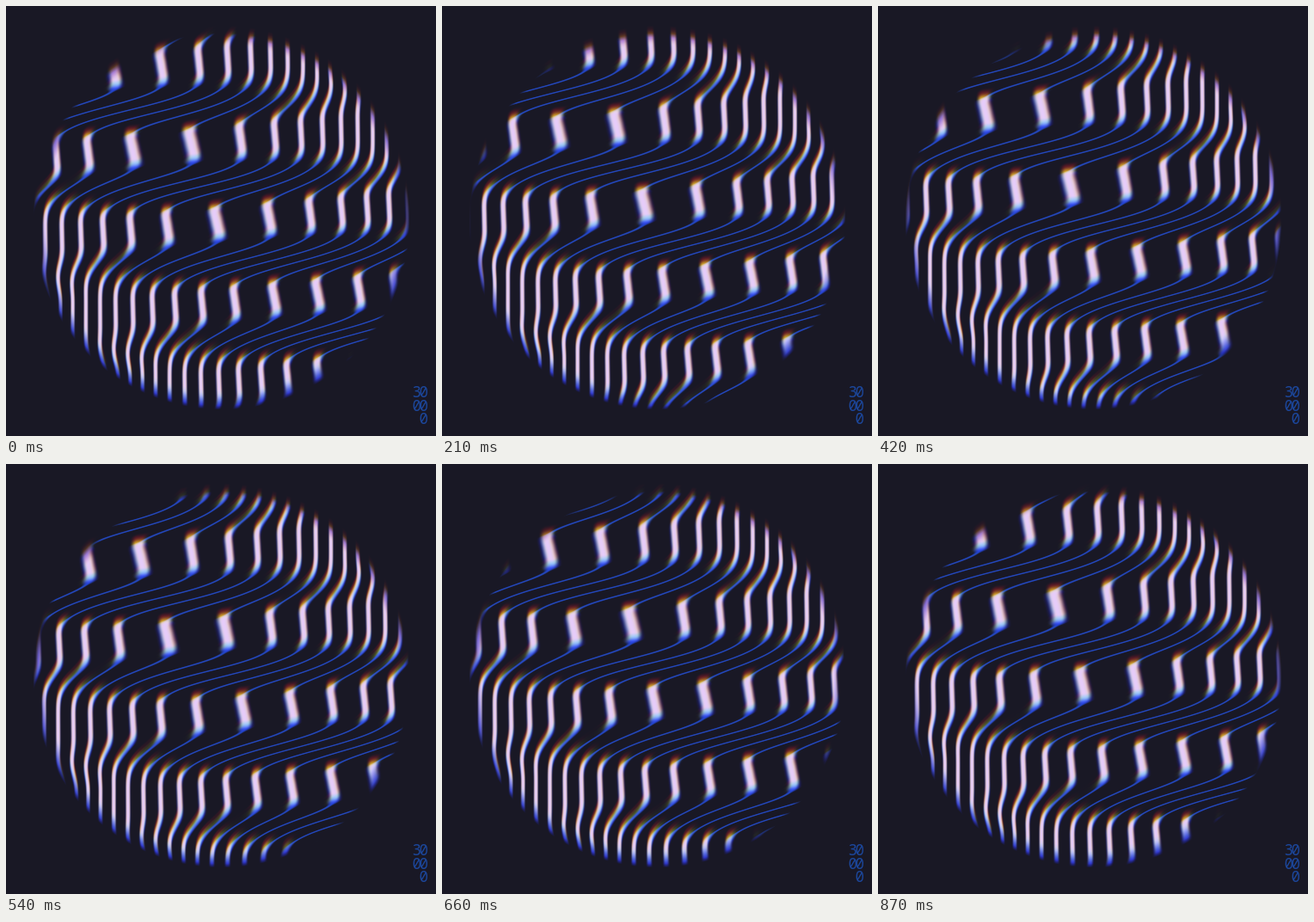
Recreate the animation shown at these times as an HTML page with a canvas. Size 500x500 px, loop 900 ms.

```html
<!DOCTYPE html>
<html lang="en">
<head>
<meta charset="utf-8">
<title>Flame waves</title>
<style>
  html, body { margin: 0; width: 100%; height: 100%; overflow: hidden; background: #191825; }
  canvas, svg { position: absolute; left: 0; top: 0; width: 500px; height: 500px; }
  text { font: 300 17.5px "Noto Sans Mono", monospace; letter-spacing: -2.5px; fill: #1c479c; }
</style>
</head>
<body>
<canvas id="stage" width="500" height="500"></canvas>
<svg viewBox="0 0 500 500">
  <text x="472.5" y="455">30</text>
  <text x="472.5" y="470.5">00</text>
  <text x="480.5" y="486">0</text>
</svg>
<script>
const SIZE = 500, MID = 250, RADIUS = 219;
const LOOP = 900, STEPS = 30;
const PITCH = 16.2;                        // spacing of undisturbed lines
const ROW = 94, TILT = 0.09;               // height and slope of the wave rows
const SHIFT = 7.3, SPAN = Math.PI / 560;   // diagonal shear
const BEND = 10, CURL = 0.0082;            // slight bow of that diagonal
const WAVE = 2 * Math.PI / ROW;
const BG = [25, 24, 37];

const ctx = document.getElementById("stage").getContext("2d");
const buffer = () => new Float32Array(SIZE * (SIZE + 12));
const glow = buffer(), core = buffer(), thin = buffer();
const frames = [];

const { sin, cos, abs, hypot, round } = Math;
const clamp = v => v < 0 ? 0 : v > 1 ? 1 : v;
const smooth = v => { v = clamp(v); return v * v * (3 - 2 * v); };

// Lines are the integer contours of a diagonal shear seen through a staircase wave.
function shade(x, y, turn, rim) {
  const a = WAVE * (y + TILT * x - 276) + 2 * Math.PI * turn;
  const lift = (1.4 * sin(a) - 0.1 * sin(2 * a) - 0.04 * sin(3 * a)) / WAVE;
  const rate = 1.4 * cos(a) - 0.2 * cos(2 * a) - 0.12 * cos(3 * a);
  const h = y - lift, hx = -TILT * rate, hy = 1 - rate;

  const e = CURL * (x + h - 570);
  const bow = BEND * (1 - cos(e)), slope = BEND * CURL * sin(e);
  const d = SPAN * (x - h - bow - 11);
  const u = x / PITCH - 11 - SHIFT * sin(d);
  const k = -SHIFT * SPAN * cos(d);
  const ux = 1 / PITCH + k * (1 - hx - slope * (1 + hx));
  const uy = -k * hy * (1 + slope);
  const g = hypot(ux, uy);

  const dist = abs(u - round(u)) / g;
  const upright = smooth((abs(ux) / g - 0.5) / 0.45);
  const q = clamp(dist / (0.9 + (0.04 + 0.15 * upright) / g));
  const i = y * SIZE + x;
  glow[i] = (1 - q * q) ** 2 * clamp(rim / 5);
  thin[i] = glow[i] * (1 - upright);
  core[i] = smooth(1.4 * (1 - dist / (1.2 + 0.14 / g))) * upright * clamp(rim / 14);
}

function render(turn) {
  for (let y = 0; y < SIZE; y++) {
    for (let x = 0; x < SIZE; x++) {
      const rim = RADIUS - hypot(x - MID, y - MID);
      if (rim > 0) shade(x, y, turn, rim);
    }
  }
  const img = ctx.createImageData(SIZE, SIZE), px = img.data;
  for (let i = 0, o = 0; i < SIZE * SIZE; i++, o += 4) {
    const at = n => core[i + n * SIZE];
    // red and green sit higher than blue, which gives the warm tips
    const red = (at(2) + at(5) + at(9)) / 3;
    const green = (at(1) + at(3) + at(5)) / 3;
    px[o] = BG[0] + 10 * glow[i] + 195 * red;
    px[o + 1] = BG[1] + 10 * glow[i] + 38 * thin[i] + 170 * green;
    px[o + 2] = BG[2] + 155 * glow[i] + 58 * core[i];
    px[o + 3] = 255;
  }
  return img;
}

let shown = -1;
function draw(now) {
  const step = Math.floor((now % LOOP) * STEPS / LOOP);
  if (step !== shown) {
    frames[step] = frames[step] || render(step / STEPS);
    ctx.putImageData(frames[step], 0, 0);
    shown = step;
  }
}

function tick() {
  draw(performance.now());
  requestAnimationFrame(tick);
}
tick();
</script>
</body>
</html>
```
